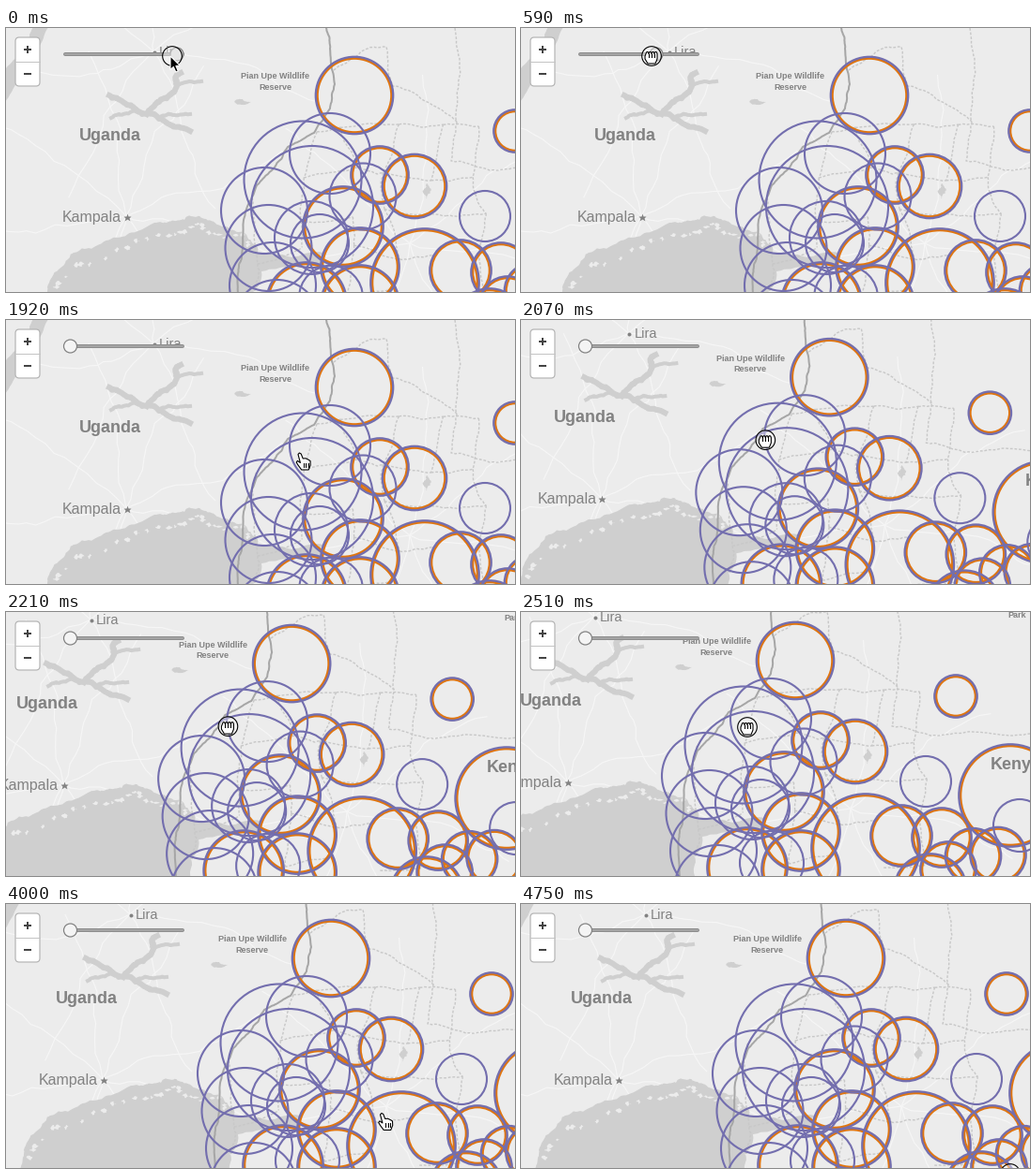
These frames come from a looping animation (542x282 px, 4850 ms). A matplotlib script:

```python
import numpy as np
import matplotlib.pyplot as plt
from matplotlib.animation import FuncAnimation
from matplotlib.patches import Circle, FancyBboxPatch, Polygon
from matplotlib.transforms import Affine2D

W, H = 542, 282
LOOP, STEP = 4850, 50
LAND, WATER = "#ececec", "#cfcfcf"
PURPLE, ORANGE = "#736eae", "#e0750f"
LABEL = "#828282"

rng = np.random.default_rng(7)
fig = plt.figure(figsize=(W / 72, H / 72), dpi=72, facecolor=LAND)
ax = fig.add_axes([0, 0, 1, 1])
ax.set(xlim=(0, W), ylim=(H, 0))
ax.axis("off")

pan = Affine2D()
hand_pos = Affine2D()
on_map = pan + ax.transData
on_cursor = hand_pos + ax.transData


def rough(points, amp, depth=4):
    """Break straight segments up by midpoint displacement."""
    p = np.array(points, float)
    for _ in range(depth):
        q = np.empty((2 * len(p) - 1, 2))
        q[::2] = p
        q[1::2] = (p[:-1] + p[1:]) / 2 + rng.uniform(-amp, amp, (len(p) - 1, 2))
        p, amp = q, amp / 2
    return p


def area(points, color=WATER, amp=2.0, z=1):
    shape = rough(points + points[:1], amp)
    ax.add_patch(Polygon(shape, fc=color, ec="none", transform=on_map, zorder=z))


def blob(x, y, rx, ry, color=WATER, z=1):
    area([(x - rx, y), (x, y - ry), (x + rx, y), (x, y + ry)], color, min(rx, ry) / 2, z)


def line(points, color, width, z, amp=1.5, **kw):
    x, y = rough(points, amp).T
    ax.plot(x, y, color=color, lw=width, zorder=z, transform=on_map, **kw)


def label(x, y, text, size, weight="bold", ha="left"):
    ax.text(x, y, text, fontsize=size, color=LABEL, weight=weight, ha=ha,
            va="baseline", family="Liberation Sans", transform=on_map, zorder=5)


# Great lake with islands along its north shore
shore = [(36, 302), (46, 272), (72, 240), (114, 224), (158, 208), (186, 205), (206, 201),
         (228, 211), (254, 219)]
area(shore + [(268, 240), (338, 240), (338, 252), (272, 260), (264, 302)], amp=5)
for x, y in rough(shore, 8, 2)[4:]:
    blob(x + 4, y + 13, rng.uniform(2, 5), rng.uniform(1, 3), LAND, 1.2)

# Branching lake, built from its arms
for arm, width in [([(110, 72), (126, 80), (145, 92), (166, 97), (196, 110)], 6),
                   ([(150, 92), (166, 76), (182, 62), (186, 48)], 6),
                   ([(112, 96), (140, 90)], 4),
                   ([(166, 94), (196, 92)], 4),
                   ([(182, 62), (208, 57)], 4)]:
    line(arm, WATER, width, 1, 4)
area([(-5, 48), (25, 12), (30, -5), (47, -5), (26, 38), (-5, 84)])
blob(252, 79, 9, 3)
blob(448, 174, 4.5, 8)

# Roads fan out from the towns
for x, y, count in [(128, 201, 9), (157, 25, 7), (430, 230, 7)]:
    for angle in np.linspace(0, 2 * np.pi, count, endpoint=False) + .3:
        end = (x + 180 * np.cos(angle), y + 180 * np.sin(angle))
        line([(x, y), end], "#f6f6f6", 1.2, .8, 16)

# District lines: two long ones, then a loose mesh
DASH = dict(color="#c8c8c8", width=1.4, z=3, amp=3, ls=(0, (2, 1.3)))
line([(478, 0), (482, 60), (480, 100), (474, 142), (515, 152), (560, 148), (621, 150)], **DASH)
line([(349, 45), (378, 25), (405, 20), (412, 62), (446, 78), (480, 100)], **DASH)
cols, rows = 6, 5
mesh = np.array([[(275 + 46 * c, 110 + 44 * r) for c in range(cols)] for r in range(rows)])
mesh = mesh + rng.uniform(-12, 12, mesh.shape)
for r in range(rows):
    for c in range(cols):
        for r2, c2 in [(r, c + 1), (r + 1, c)]:
            if r2 < rows and c2 < cols and min(r, r2) + c > 0 and rng.random() < .75:
                line([mesh[r, c], mesh[r2, c2]], **DASH)

line([(341, 0), (345, 22), (350, 60), (345, 86), (328, 112), (300, 127), (285, 150),
      (267, 168), (253, 205), (251, 245), (247, 262), (248, 302)], "#a6a6a6", 2, 4, 1.5)

label(78, 120, "Uganda", 18)
label(579, 188, "Kenya", 18)
label(60, 207, "Kampala", 16, "normal")
label(163, 30, "Lira", 14.5, "normal")
label(287, 54.5, "Pian Upe Wildlife", 9, ha="center")
label(287, 65.5, "Reserve", 9, ha="center")
label(597, 26, "Park", 9)
for x, y, mark, size in [(128.5, 201.5, "*", 9), (157.5, 25.5, "o", 4)]:
    ax.plot(x, y, mark, ms=size, mfc=LABEL, mec="none", transform=on_map, zorder=5)


def ring(x, y, r, double=False):
    layers = [(r, PURPLE, 2.1, 7)]
    if double:
        layers = [(r - 1, ORANGE, 2.6, 6), (r + .7, PURPLE, 2.3, 7)]
    for radius, color, width, z in layers:
        ax.add_patch(Circle((x, y), radius, fill=False, ec=color, lw=width,
                            transform=on_map, zorder=z))


for spot in [(371, 72, 40.5), (398, 157, 30), (435, 169, 33.5), (542, 110, 22),
             (359, 212, 42), (446, 272, 57), (484, 259, 32), (527, 261, 31),
             (320, 293, 42), (515, 317, 38), (600, 216, 54)]:
    ring(*spot, double=True)
for spot in [(345, 134, 43), (316, 162, 62.5), (326, 191, 65), (380, 180, 35.5),
             (510, 201, 27), (325, 224, 39), (334, 230, 31), (346, 288, 34),
             (610, 248, 28)]:
    ring(*spot)
for k in range(4):
    ring(275 + 4.5 * k, 195 + 40 * k, 46)
for k in range(2):
    ring(377, 255 + 40 * k, 41, double=True)
for k in range(3):
    ring(534 + 26.5 * k, 295 - 17 * np.sin(k), 29, double=True)

# Zoom buttons
ax.add_patch(FancyBboxPatch((10, 10), 26, 52, boxstyle="round,pad=0,rounding_size=4",
                            fc="white", ec="#b4b4b4", lw=1.2, zorder=10))
ax.plot([10, 36], [36, 36], color="#c4c4c4", lw=1, zorder=11)
for xs, ys in [((19, 27), (23, 23)), ((23, 23), (19, 27)), ((19, 27), (49, 49))]:
    ax.plot(xs, ys, color="#444444", lw=2, solid_capstyle="butt", zorder=11)

# Slider
for color, width in [("#8e8e8e", 4), ("#a4a4a4", 2)]:
    ax.plot([63, 188], [28, 28], color=color, lw=width, solid_capstyle="round", zorder=10)
knob = ax.add_patch(Circle((182, 28), 7, ec="#808080", lw=1.2, zorder=12))

# Pointer shapes
press = ax.add_patch(Circle((0, 0), 10.3, fc=(1, 1, 1, .4), ec="black", lw=1.1,
                            transform=on_cursor, zorder=20))


def pointer(points, fc="white", ec="black", ticks=(), top=0, bottom=0):
    parts = [ax.add_patch(Polygon(points, fc=fc, ec=ec, lw=1.1, joinstyle="round",
                                  transform=on_cursor, zorder=21))]
    for x in ticks:
        parts += ax.plot([x, x], [top, bottom], color="black", lw=1,
                         transform=on_cursor, zorder=22)
    return parts


# Four rounded knuckles over a tapering palm
knuckle_x = np.linspace(-6, 6, 25)
knuckle_y = -2.5 - 2 * np.abs(np.sin(np.pi * (knuckle_x + 6) / 3)) ** .5
fist = list(zip(knuckle_x, knuckle_y)) + [(6, 3), (4, 8), (-4, 8), (-7, 3), (-7, 0)]

pointers = {
    "arrow": pointer([(-2, 0), (-2, 14.5), (1.3, 11.5), (3.8, 17), (6.3, 16), (3.9, 10.5),
                      (8.3, 10.3)], "black", "white"),
    "hand": pointer([(-6, -7.5), (-4.6, -9), (-2.8, -8), (-.8, -3), (2, -3.2), (4.6, -2),
                     (7, -.5), (7.2, 4), (5.2, 9), (-2.3, 9), (-6, 4), (-7.8, 1),
                     (-6.6, -.6), (-3.6, 1.5)], ticks=(-.3, 2.2, 4.6), top=2, bottom=6),
    "fist": pointer(fist, ticks=(-3, 0, 3), top=-2.5, bottom=.5),
}


def mix(a, b, u):
    return np.array(a) + (np.array(b) - np.array(a)) * u


# Timeline: time, pointer position, map offset, pointer kind, pressed
HOME, PULLED, REST = (0, 0), (-79, -20), (-25, -14)
START, LEFT_END, OVER_MAP = (177, 30), (57, 30), (317, 151)
RELEASE, PARK, EXIT = (285, 136), (391, 226), (521, 288)
states = [(0, START, HOME, "arrow", True)]


def move(t0, t1, steps, start, end, offset, kind, pressed=False):
    for t, u in zip(np.linspace(t0, t1, steps), np.arange(1, steps + 1) / steps):
        spot = mix(start, end, u * u * (3 - 2 * u))
        states.append((t, spot, offset, kind, pressed))


move(150, 1180, 8, START, LEFT_END, HOME, "fist", True)
move(1470, 1920, 4, LEFT_END, OVER_MAP, HOME, "hand")
for t, u in zip(np.linspace(2070, 2510, 4), np.arange(1, 5) / 4):
    offset = np.array(PULLED) * (1 - (1 - u) ** 2.7)
    ahead = np.array((17, 4)) * u ** 6  # the hand turns back before the map does
    grip = offset + (303, 139) + ahead
    states.append((t, grip, offset, "fist", True))
states.append((2650, mix(grip, RELEASE, .5), mix(PULLED, REST, .5), "fist", True))
states.append((2800, RELEASE, REST, "hand", False))
move(2950, 3400, 4, RELEASE, PARK, REST, "hand")
move(4000, 4600, 5, PARK, EXIT, REST, "hand")
states.append((4750, EXIT, REST, "fist", True))


def draw(i):
    # Sample late in each tick so that no change shows after its time.
    now = i * STEP + 40
    t, (x, y), offset, kind, pressed = [s for s in states if s[0] <= now][-1]
    pan.clear().translate(*offset)
    hand_pos.clear().translate(x, y)
    sliding = t < 1400
    knob.center = (np.clip(x + 5, 68.5, 182) if sliding else 68.5, 28)
    knob.set_facecolor("#d6d6d6" if sliding else "#f4f4f4")
    press.set_visible(pressed)
    for name, parts in pointers.items():
        for part in parts:
            part.set_visible(name == kind)
    return []


anim = FuncAnimation(fig, draw, frames=LOOP // STEP, interval=STEP, repeat=True,
                     repeat_delay=0, init_func=lambda: draw(0), blit=False)
plt.show()
```
